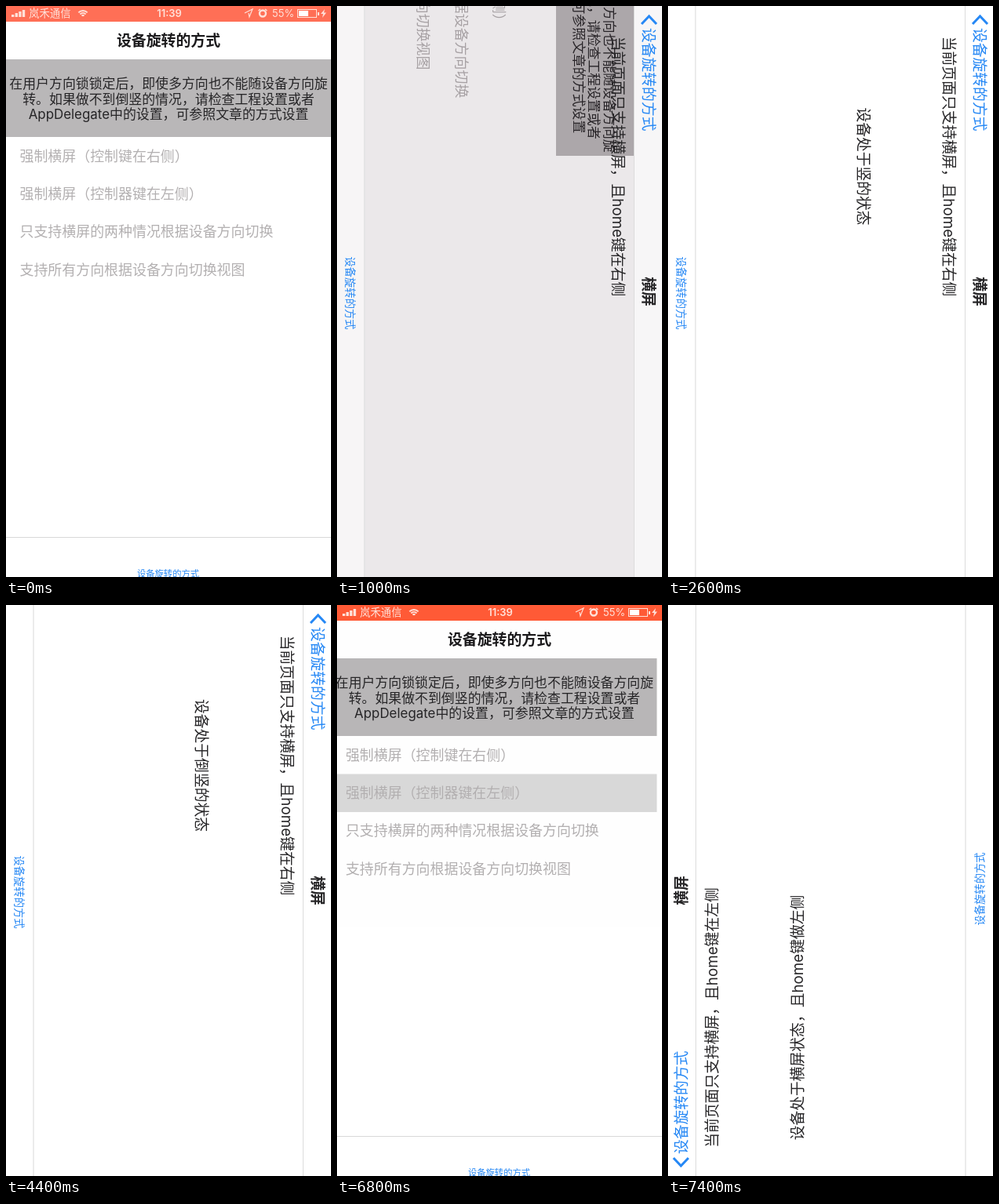
Write an HTML page with a canvas that moves like this. It is 414x728 px and loops after 8000 ms.

```html
<!DOCTYPE html>
<html lang="zh-CN">
<head>
<meta charset="utf-8">
<style>
html, body { margin: 0; width: 100%; height: 100%; overflow: hidden; background: #000; }
canvas { display: block; }
</style>
</head>
<body>
<canvas width="414" height="728"></canvas>
<script>
const ctx = document.querySelector('canvas').getContext('2d');
// The phone screen is a little longer than the stage and centred on it
const SHORT = 414, LONG = 736;
const LOOP = 8000, STEP = 200, BLUE = '#2688f5', INK = '#262527', PALE = '#ffe0d8';
const NAME = '设备旋转的方式';
const lerp = (a, b, k) => a + (b - a) * k;

function rect(x, y, w, h, color) {
  ctx.fillStyle = color;
  ctx.fillRect(x, y, w, h);
}

// y is the vertical middle of the line
function text(str, x, y, size, color, align = 'left', weight = 400) {
  ctx.font = `${weight} ${size}px Inter, "Noto Sans CJK SC", "Noto Sans CJK", sans-serif`;
  ctx.textAlign = align;
  ctx.fillStyle = color;
  ctx.fillText(str, x, y + size * 0.37);
}

function path(points, color, width) {
  ctx.beginPath();
  points.forEach(([x, y]) => ctx.lineTo(x, y));
  if (width) {
    ctx.strokeStyle = color;
    ctx.lineWidth = width;
    ctx.stroke();
  } else {
    ctx.fillStyle = color;
    ctx.fill();
  }
}

function arc(x, y, r, from, to, width) {
  ctx.beginPath();
  ctx.arc(x, y, r, from * Math.PI, to * Math.PI);
  ctx.strokeStyle = PALE;
  ctx.lineWidth = width;
  ctx.stroke();
}

function statusIcons() {
  for (let i = 0; i < 4; i++) rect(7 + i * 4.6, 15 - i * 2, 3.4, 3 + i * 2, PALE);
  text('岚禾通信', 29, 13.5, 13.4, PALE);
  for (const r of [2, 5, 8]) arc(98, 18, r, 1.25, 1.75, 2);
  text('11:39', 208, 13.5, 13, PALE, 'center', 600);
  path([[304, 13], [314, 8], [310, 18], [309, 13]], PALE, 1.2);
  arc(327, 13.5, 4, 0, 2, 2.4);
  path([[321.5, 10], [324, 8]], PALE, 1.6);
  path([[330, 8], [332.5, 10]], PALE, 1.6);
  text('55%', 339, 13.5, 13, PALE);
  ctx.lineWidth = 1;
  ctx.strokeRect(371.5, 8.5, 24, 10);
  rect(373, 10, 12, 7, '#fff');
  rect(397, 12, 2, 4, PALE);
  path([[406, 8], [401, 14], [404, 14], [403, 19], [408, 12.5], [405, 12.5]], PALE);
}

function menu(selected) {
  rect(0, 72, SHORT, 99, '#b9b7b8');
  ['在用户方向锁锁定后，即使多方向也不能随设备方向旋',
   '转。如果做不到倒竖的情况，请检查工程设置或者',
   'AppDelegate中的设置，可参照文章的方式设置'
  ].forEach((line, i) => text(line, 207, 102.5 + i * 19.8, 16.9, INK, 'center'));
  if (selected >= 0) rect(0, 171 + selected * 48.5, SHORT, 48.5, '#d9d9d9');
  ['强制横屏（控制键在右侧）', '强制横屏（控制器键在左侧）',
   '只支持横屏的两种情况根据设备方向切换', '支持所有方向根据设备方向切换视图'
  ].forEach((line, i) => text(line, 17.5, 195 + i * 48.4, 17.95, '#b3b0b1'));
}

function detail(dir, status) {
  const mid = dir > 0 ? 208.5 : 206;
  text(`当前页面只支持横屏，且home键在${dir > 0 ? '右' : '左'}侧`, mid, 56, 18.8, INK, 'center');
  text(status, mid, 165.5, 18.8, INK, 'center');
}

function landscapeNav(color) {
  rect(0, 0, LONG, 35, color);
  rect(0, 35, LONG, 1, '#dcdcdc');
  path([[27, 7], [17, 16.5], [27, 26]], BLUE, 3);
  text(NAME, 32, 17, 18.8, BLUE);
  text('横屏', LONG / 2, 17, 18.8, INK, 'center', 600);
}

// turn: rotation progress, push: page slide progress, done: menu page removed
function draw({ turn = 0, push = 0, dir = 1, done = false, status = '', selected = -1, bar = '#ff5a36' }) {
  const w = lerp(SHORT, LONG, turn), h = lerp(LONG, SHORT, turn);
  const barHeight = 24 * (1 - turn) ** 2;
  rect(0, 0, 414, 728, '#000');
  ctx.save();
  ctx.translate(207, 364);
  ctx.rotate(dir * turn * Math.PI / 2);
  ctx.translate(-w / 2, -h / 2);
  ctx.beginPath();
  ctx.rect(0, 0, w, h);
  ctx.clip();
  rect(0, 0, w, h, '#fff');

  if (!done) {
    ctx.save();
    ctx.translate(-219 * push, turn < 1 ? 0 : -36);
    menu(selected);
    ctx.restore();
    rect(0, barHeight, w, SHORT - barHeight, `rgba(65,35,55,${0.1 * push})`);
    if (turn < 0.6) text(NAME, w / 2, 48, 18.9, '#1c1b1d', 'center', 600);
    rect(0, 0, w, barHeight, bar);
    if (!turn) statusIcons();
  }
  if (push) {
    ctx.save();
    ctx.translate(LONG * (1 - push), 0);
    detail(dir, status);
    ctx.restore();
  }
  if (turn === 1) landscapeNav(done ? '#fff' : '#f7f6f7');

  const tab = lerp(55, 35.5, turn);
  rect(0, h - tab, w, tab, turn && !done ? '#f7f5f6' : '#fff');
  rect(0, h - tab, w, 1, '#d8d8d8');
  text(NAME, w / 2 + 2.5 * turn - 0.5, h - lerp(8, 17, turn), lerp(11.3, 13.3, turn), BLUE, 'center', 500);
  ctx.restore();
}

function sceneAt(t) {
  const left = { dir: -1, status: '设备处于横屏状态，且home键做左侧' };
  if (t < 200) return { bar: '#ff6f56' };
  if (t < 600) return {};
  if (t < 800) return { selected: 0 };
  if (t < 1000) return { turn: 0.62, push: 0.79 };
  if (t < 1200) return { turn: 1, push: 1 };
  if (t < 6000) {
    const status = t < 2600 ? '' : t < 3400 ? '设备处于竖的状态'
      : t < 4400 ? '设备处于横屏状态，且home键做右侧' : '设备处于倒竖的状态';
    return { turn: 1, push: 1, done: true, status };
  }
  if (t < 6800) return {};
  if (t < 7000) return { ...left, push: 0.03, selected: 1 };
  if (t < 7200) return { ...left, turn: 0.737, push: 0.87 };
  return { ...left, turn: 1, push: 1, done: t >= 7400 };
}

function tick() {
  const t = performance.now() % LOOP;
  draw(sceneAt(Math.floor(t / STEP) * STEP));
  requestAnimationFrame(tick);
}
tick();
</script>
</body>
</html>
```
